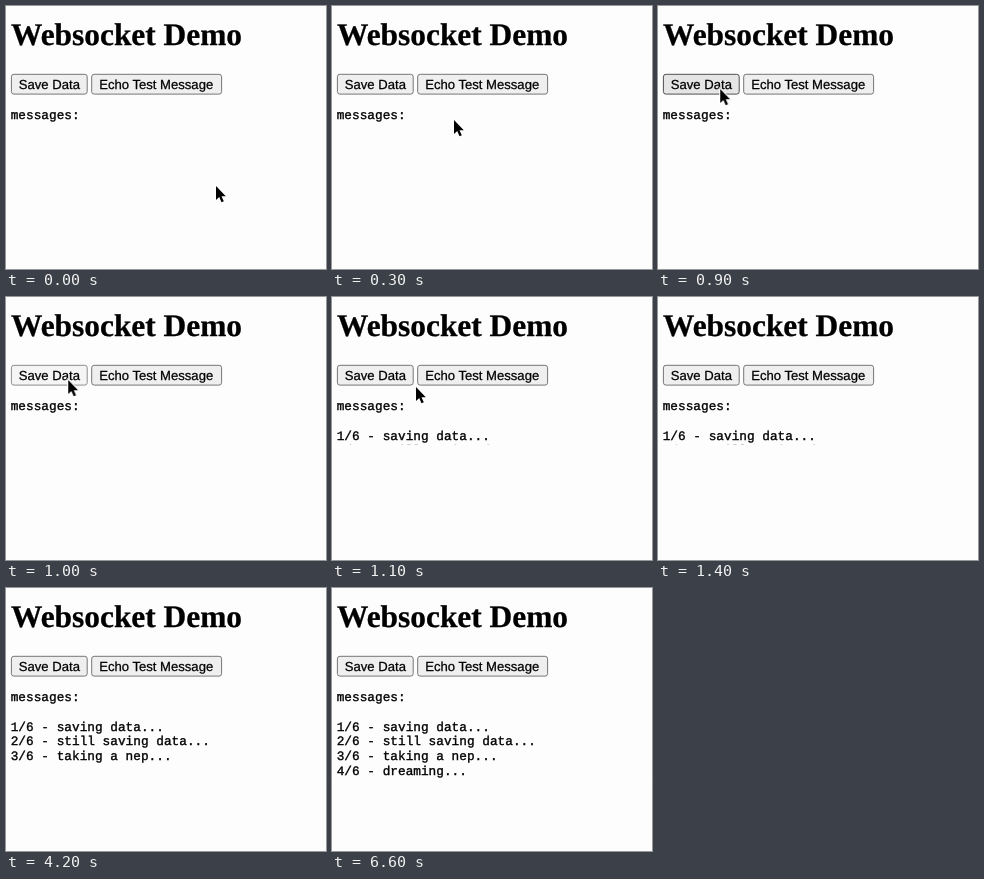
Recreate the animation shown at these times as an HTML page. Size 320 by 263 pixels, loop 8 s.

```html
<!DOCTYPE html>
<html lang="en">
<head>
<meta charset="utf-8">
<title>Websocket Demo</title>
<style>
  html, body { margin: 0; width: 100%; height: 100%; overflow: hidden; background: #fefdfe; }
  svg { display: block; width: 100%; height: 100%; }
  text { text-rendering: geometricPrecision; font-kerning: none; white-space: pre; stroke: #000; }
  .title { font: bold 31.4px "Liberation Serif", serif; stroke-width: .3px; }
  .label { font: 13.1px "Liberation Sans", sans-serif; stroke-width: .25px; }
  .log { font: 12.78px "Liberation Mono", monospace; stroke-width: .35px; }
  .button { fill: #efefef; stroke: #767676; }

  .save, .cover, .cursor { animation: 8s step-end infinite; }
  .save { animation-name: press; }
  .cover { animation-name: reveal; fill: #fefdfe; }
  .cursor { animation-name: travel; }

  /* Idle, hovered, held down, idle. */
  @keyframes press {
    0% { fill: #efefef; stroke: #767676; }
    6.25% { fill: #e5e5e5; stroke: #4f4f4f; }
    12.5% { fill: #f5f5f5; stroke: #8d8d8d; }
    13.75%, 100% { fill: #efefef; stroke: #767676; }
  }
  /* Each step uncovers one more line of the log. */
  @keyframes reveal {
    0% { transform: translateY(0); }
    13.75% { transform: translateY(14.7px); }
    26.25% { transform: translateY(29.4px); }
    52.5% { transform: translateY(44.1px); }
    82.5%, 100% { transform: translateY(58.8px); }
  }
  /* The pointer is sampled every 100 ms, so it moves in jumps. */
  @keyframes travel {
    0% { transform: translate(210px, 180px); }
    1.25% { transform: translate(201px, 172px); }
    2.5% { transform: translate(168px, 145px); }
    3.75% { transform: translate(122px, 114px); }
    5% { transform: translate(86px, 95px); }
    6.25% { transform: translate(68px, 87px); }
    7.5% { transform: translate(63px, 86px); }
    8.75% { transform: translate(62.2px, 83px); }
    13.75% { transform: translate(84px, 90px); }
    15% { transform: translate(160px, 112px); }
    16.25% { transform: translate(276px, 142px); }
    17.5%, 100% { transform: translate(340px, 160px); }
  }
</style>
</head>
<body>
<svg viewBox="0 0 320 263" preserveAspectRatio="none">
  <text class="title" x="5" y="38.6">Websocket Demo</text>

  <rect class="button save" x="5.4" y="68.3" width="75.8" height="19.8" rx="2.5"/>
  <text class="label" x="12.8" y="82.6">Save Data</text>
  <rect class="button" x="85.7" y="68.3" width="129.9" height="19.8" rx="2.5"/>
  <text class="label" x="93.2" y="82.6">Echo Test Message</text>

  <g class="log">
    <text x="4.7" y="113">messages:</text>
    <text x="4.7" y="142.7">1/6 - saving data...</text>
    <text x="4.7" y="157.4">2/6 - still saving data...</text>
    <text x="4.7" y="172.1">3/6 - taking a nep...</text>
    <text x="4.7" y="186.8">4/6 - dreaming...</text>
  </g>
  <rect class="cover" x="0" y="132.4" width="320" height="131"/>

  <path class="cursor" d="M0 0V14L3.2 11 5.5 16.2 7.8 15.2 5.5 10.2H9.8Z"
    stroke="#fff" stroke-width="2" paint-order="stroke"/>
</svg>
</body>
</html>
```
